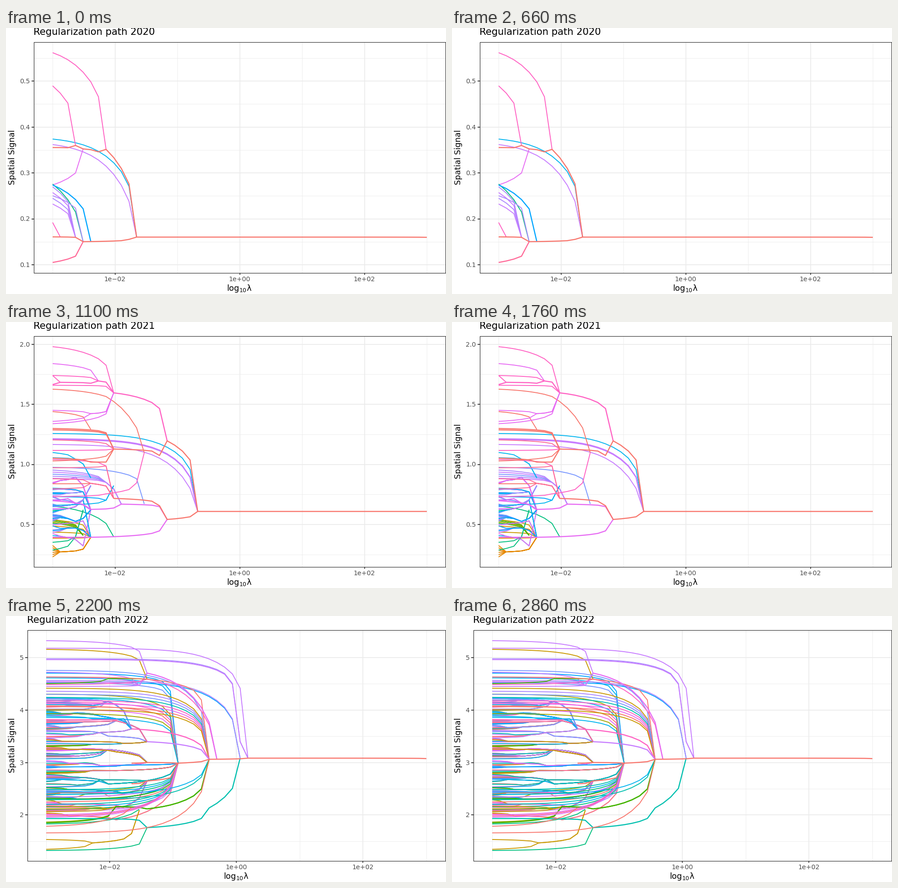
Animation, 963 px wide and 582 px high, one loop 3300 ms. Source, as a matplotlib script:

```python
import numpy as np
import matplotlib.pyplot as plt
from matplotlib.animation import FuncAnimation

W, H, DPI = 963, 582, 100
PX = 72 / DPI                      # points per pixel
STEPS = 50
LAM = np.logspace(-3, 3, STEPS)    # penalty grid

ORANGE, GOLD, OLIVE, LIME = "#E58700", "#C99800", "#A3A500", "#39B600"
GREEN, TEAL, SKY, AZURE = "#00BF7D", "#00C0AF", "#00B4EF", "#00A5FF"
PERI, LILAC, VIOLET = "#7997FF", "#AC88FF", "#C77CFF"
MAGENTA, PINK, ROSE, RED = "#E76BF3", "#FF61C3", "#FF6A98", "#F8766D"
COOL = [SKY, LILAC, AZURE, VIOLET, PERI]
WARM = [MAGENTA, PINK, VIOLET, ROSE, RED]
EARTH = [GREEN, TEAL, GOLD, LIME, SKY]
THIN, THICK = 1.9, 2.4
GRID, BORDER, GREY = "#EBEBEB", "#333333", "#4D4D4D"
TOP, BOTTOM, RIGHT = 30.5, 535.5, 961.5

plt.rcParams["font.family"] = "DejaVu Sans"
fig = plt.figure(figsize=(W / DPI, H / DPI), dpi=DPI, facecolor="white")
ax = fig.add_axes([0, 0, 1, 1])


def rule(xs, ys, color, w, z):
    ax.plot(xs, ys, color=color, lw=w * PX, zorder=z, solid_capstyle="butt")


def text(x, y, s, size, color="black", **kw):
    ax.text(x, y, s, fontsize=size * PX, color=color, va="baseline", **kw)


def group(y, cell, k_min, k_span, sway):
    """Joint shared by all paths whose height falls in the same cell."""
    i = round(y / cell)
    return k_min + 7 * i % k_span, cell * i + sway * np.sin(2.4 * i)


class Chart:
    def __init__(self, left, x_first, x_last):
        self.left, self.x_first = left, x_first
        self.step = (x_last - x_first) / (STEPS - 1)

    def path(self, color, y, *joints, drift=0.6, w=THIN, start=0):
        """Run through (step, y) joints: a drift linear in the penalty,
        then a snap into the joint."""
        k, ys = start, [y]
        for k_end, y_end in joints:
            lam = LAM[k:k_end + 1]
            r = (lam[1:] - lam[0]) / (lam[-1] - lam[0])
            ys.extend(y + (y_end - y) * (drift * r + (1 - drift) * r**8))
            k, y = k_end, y_end
        xs = self.x_first + self.step * np.arange(start, k + 1)
        ax.plot(xs, ys, color=color, lw=w * PX, zorder=10,
                solid_capstyle="butt", solid_joinstyle="round")

    def trunk(self, color, first, *joints, **kw):
        self.path(color, first[1], *joints, start=first[0], w=THICK, **kw)

    def fan(self, colors, y_from, y_to, count, *joints, **kw):
        for i, y in enumerate(np.linspace(y_from, y_to, count)):
            self.path(colors[i % len(colors)], y, *joints, **kw)

    def tangle(self, seed, count, span, cell, spans, ends, colors):
        """Random paths that fuse twice locally, then into a shared end."""
        rng = np.random.default_rng(seed)
        for y in rng.uniform(*span, count):
            one = group(y, cell, *spans[0], cell * 0.7)
            two = group(one[1], cell * 2.2, *spans[1], cell * 2)
            near = sorted(ends, key=lambda e: abs(e[1] - two[1]))
            end = near[int(two[1]) % min(2, len(near))]
            self.path(colors[rng.integers(len(colors))], y, one, two, end)

    def frame(self, year, y_top, gap, value, dv, count, fmt):
        unit = self.step * (STEPS - 1) / 6
        minors = y_top + gap * (np.arange(count + 1) - 0.5)
        majors = y_top + gap * np.arange(count)
        decades = self.x_first + unit * np.array([1, 3, 5])
        halves = self.x_first + unit * np.array([0, 2, 4, 6])
        for xs, ys, w in ((halves, minors, 0.9), (decades, majors, 1.75)):
            for x in xs:
                rule([x, x], [TOP, BOTTOM], GRID, w, 1)
            for y in ys:
                if TOP < y < BOTTOM:
                    rule([self.left, RIGHT], [y, y], GRID, w, 1)
        for x, label in zip(decades, ("1e\u221202", "1e+00", "1e+02")):
            rule([x, x], [BOTTOM, BOTTOM + 4.5], BORDER, 1.75, 40)
            text(x, 554, label, 14.1, GREY, ha="center")
        for i, y in enumerate(majors):
            rule([self.left - 4.5, self.left], [y, y], BORDER, 1.75, 40)
            text(self.left - 8, y + 5, format(value - dv * i, fmt), 14.1,
                 GREY, ha="right")
        rule([self.left, self.left, RIGHT, RIGHT, self.left],
             [TOP, BOTTOM, BOTTOM, TOP, TOP], BORDER, 1.2, 41)
        text(self.left, 15.3, f"Regularization path {year}", 21.15)
        text((self.left + RIGHT) / 2, 575, "log$_{10}$\u03bb", 17.6,
             ha="center")
        text(19, (TOP + BOTTOM) / 2, "Spatial Signal", 17.6, rotation=90,
             rotation_mode="anchor", ha="center")


def year_2020():
    c = Chart(60.5, 102, 921)
    c.frame(2020, 116, 100.5, 0.5, 0.1, 5, ".1f")
    knee, bend, low, end = (7, 265.5), (4, 264.5), (4, 467.5), (11, 457.5)

    c.path(SKY, 243, end)
    c.path(VIOLET, 255, end, drift=0.8)
    c.path(MAGENTA, 343.5, bend, drift=0.5)
    c.path(GREEN, 341.5, low, drift=0.75)
    c.fan([LILAC, VIOLET], 347.5, 385, 4, (3, 458), drift=0.5)
    c.path(LILAC, 367, low, drift=0.4)
    c.path(AZURE, 343.5, (5, 467), drift=0.6, w=THICK)
    c.path(PINK, 54, knee)
    c.path(PINK, 126.5, (3, 257), drift=0.5)
    c.path(PINK, 425.5, (1, 457))
    c.path(ROSE, 513, low, drift=0.45, w=THICK)
    c.path(RED, 261.5, (2, 262), (3, 257), bend, (6, 271), knee, end,
           drift=0.6, w=THICK)
    c.path(RED, 457, (3, 458), low, (10, 462.5), end, (49, 458), w=THICK)


def year_2021():
    c = Chart(60.5, 102, 921)
    c.frame(2021, 48.5, 131.5, 2, 0.5, 4, ".1f")
    crest, peak, end = (8, 155), (15, 260), (19, 414.5)
    upper, low, violet = (8, 278), (8, 386), (9, 398.5)
    base, valley = (5, 471), (15, 432)

    # lower branches
    c.fan([ORANGE], 489, 514, 6, (1, 503), (4, 497), base)
    c.fan([GOLD, ORANGE], 433, 473, 4, base, drift=0.4)
    c.fan([OLIVE, LIME], 432, 440, 4, (4, 467), drift=0.5)
    c.fan([GREEN], 482, 499, 2, (3, 470), (4, 411), drift=0.5)
    c.path(GREEN, 403, (8, 470), drift=0.75)

    # tangled middle
    spans = (1, 2), (3, 2)
    c.tangle(8, 24, (406, 468), 8, spans, [(5, 411), base],
             COOL + [GREEN, MAGENTA])
    c.tangle(5, 30, (350, 410), 8, spans, [(5, 411), (5, 358)],
             COOL + [MAGENTA, PINK])
    c.fan([LILAC, VIOLET, PERI], 324, 342, 5, (7, 351), violet, drift=0.7)
    c.fan([AZURE, SKY], 382, 401, 2, (7, 390), (8, 358))
    c.fan([SKY], 285.5, 297, 2, (3, 300), (5, 341))
    c.path(PERI, 318, (11, 343), (12, 398), drift=0.9)
    c.path(PINK, 382, (7, 376), (11, 352), (12, 286))
    c.fan([PINK, ROSE], 301, 319, 2, (7, 315), low)
    c.fan([ROSE, RED], 343, 365, 3, (5, 353), low, drift=0.3)

    # upper branches
    c.path(SKY, 244, end, drift=0.55)
    c.path(VIOLET, 268, end, drift=0.85)
    c.fan([VIOLET], 255.5, 257, 2, end, drift=0.65, w=THICK)
    c.path(RED, 147, (8, 174), (12, 286), drift=0.8)
    c.path(RED, 196, (5, 235), drift=0.4)
    c.fan([RED], 233, 236, 2, upper, drift=0.2, w=THICK)
    c.fan([ROSE, PINK, RED], 258, 304, 3, upper, drift=0.5)
    c.path(RED, 298, (5, 306.5), (7, 306.5), upper, w=THICK)
    c.path(PINK, 54, crest, drift=0.5)
    c.fan([MAGENTA, PINK], 91, 117, 2, (6, 129), drift=0.5)
    c.path(PINK, 117, (1, 132))
    c.path(PINK, 138.5, crest, drift=0.1)
    c.path(PINK, 137, (1, 132), (5, 134), (6, 129), (7, 131.5), crest,
           w=THICK)
    c.fan([MAGENTA], 193.3, 217.5, 2, (5, 200.5), (7, 196), crest)
    c.path(MAGENTA, 222.5, (7, 201), crest, drift=0.9)

    # fused trunks
    c.path(MAGENTA, 471, base, (14, 457), valley, drift=0.8, w=THICK)
    c.path(MAGENTA, 391, (5, 410), (8, 407), violet, (14, 404), valley,
           w=THICK)
    c.trunk(PINK, crest, peak, drift=0.4)
    c.trunk(RED, upper, (14, 292), peak, end, drift=0.4)
    c.trunk(RED, low, (14, 402), valley, end, (49, 414.5), drift=0.5)


def year_2022():
    c = Chart(46.5, 88, 920)
    c.frame(2022, 91, 114.8, 5, 1, 4, ".0f")
    arch, hub, gate, end = (13, 125), (17, 322), (21, 313.5), (26, 311)
    pink, violet, core, red = (11, 247), (13, 275), (13, 320.5), (13, 361)
    foot, teal = (9, 417), (13, 463)

    # dense part, fusing towards the joints
    ends = [pink, violet, core, red, hub]
    spans = (2, 5), (7, 4)
    c.tangle(14, 16, (376, 442), 9, spans, [red, hub],
             [GOLD, OLIVE, MAGENTA, ROSE, RED])
    c.tangle(13, 80, (300, 402), 6, spans, ends, EARTH * 2 + COOL + WARM)
    c.tangle(12, 64, (230, 312), 6, spans, ends, EARTH + COOL + WARM * 2)
    c.tangle(11, 38, (176, 240), 6, spans, ends, COOL * 2 + WARM + [GOLD])

    # fans that close on the two main joints
    c.fan([AZURE, SKY, PERI], 125, 146, 3, hub, drift=0.15)
    c.fan([OLIVE, SKY, PINK, RED, MAGENTA], 171, 222, 7, hub, drift=0.3)
    c.fan([GOLD, LILAC, PERI, TEAL, PINK, MAGENTA, RED], 158, 205, 8, gate,
          drift=0.5)
    c.fan([TEAL, SKY, GREEN, VIOLET, LIME, RED], 380, 428, 10, hub,
          drift=0.5)
    c.fan([SKY, TEAL], 390, 402, 2, gate, drift=0.7)

    # long upper branches
    c.path(GOLD, 73, (13, 138), drift=0.4)
    c.path(PERI, 119, gate, drift=0.55)
    c.fan([AZURE, LILAC], 144, 141, 2, (25, 311))
    c.fan([VIOLET, LILAC, MAGENTA], 123, 154, 4, (12, 152), arch)
    c.path(LIME, 148, (8, 137), (13, 138))
    c.path(VIOLET, 54, arch, drift=0.35)
    c.path(VIOLET, 70.5, end, drift=0.4)
    c.fan([LILAC, VIOLET], 93.5, 95.5, 2, (25, 275), end, drift=0.3)
    c.path(PINK, 150, (13, 138), (22, 313.5), drift=0.75)
    c.path(RED, 133.5, gate, drift=0.27)
    c.trunk(MAGENTA, arch, (22, 313.5), drift=0.75)

    # lower branches
    c.fan([GOLD, OLIVE], 416, 428, 3, (8, 422), foot)
    c.path(GREEN, 455, (12, 423), drift=0.9)
    c.fan([OLIVE, LIME], 451, 452.5, 2, foot, (13, 422), gate,
          drift=0.5, w=THICK)
    c.fan([GOLD], 489, 510.5, 2, (6, 496.5), (11, 476), (12, 425))
    c.path(GREEN, 513, (12, 499), teal, drift=0.9)
    c.path(TEAL, 443, (12, 447), teal, (21, 420), (25, 311), w=THICK)
    c.fan([MAGENTA, ROSE], 435, 440, 3, hub, drift=0.7)
    c.path(RED, 460, (11, 419), drift=0.9)
    c.path(RED, 474.5, gate, drift=0.7)

    # fused trunks
    c.trunk(PINK, pink, gate, drift=0.7)
    c.trunk(VIOLET, violet, gate)
    c.trunk(RED, (11, 367), red, hub, drift=0.25)
    c.trunk(RED, (11, 322), core, hub, gate, end, (49, 312))


SCENES = (year_2020, year_2021, year_2022)


def draw(i):
    ax.cla()
    ax.set_xlim(0, W)
    ax.set_ylim(H, 0)
    ax.axis("off")
    SCENES[i]()
    return []


anim = FuncAnimation(fig, draw, frames=len(SCENES), interval=1100,
                     repeat=True, repeat_delay=0)
plt.show()
```
